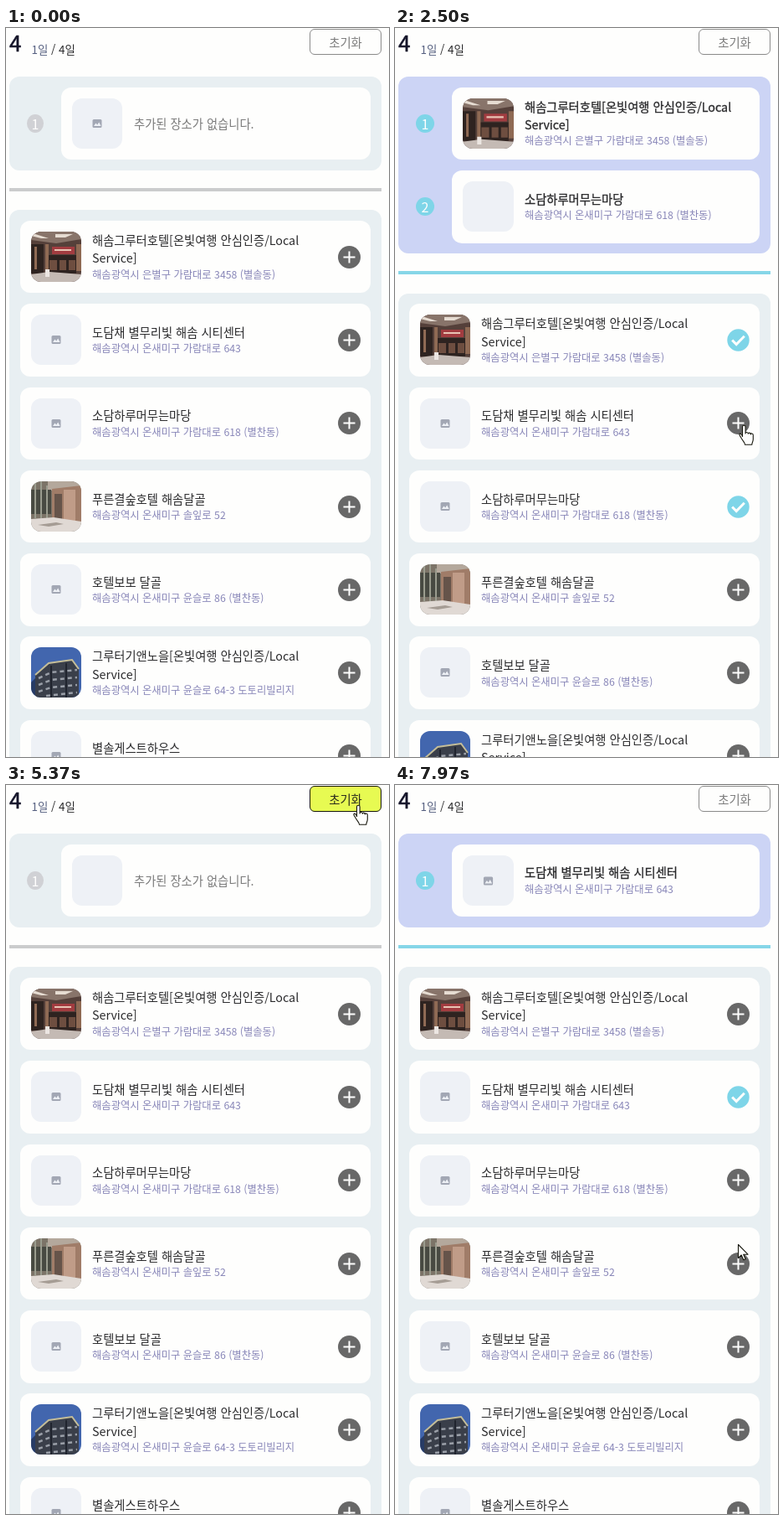
An HTML page for the animation above (8 s loop, 458 by 870 pixels).

```html
<!DOCTYPE html>
<html lang="ko">
<head>
<meta charset="utf-8">
<title>Trip planner</title>
<style>
html, body { margin: 0; width: 100%; height: 100%; overflow: hidden; background: #fefefd; }
body { font-family: 'Noto Sans CJK KR', 'Noto Sans CJK', 'Noto Sans', sans-serif; color: #2a2a2c; }
#stage { position: relative; width: 458px; height: 870px; overflow: hidden; }
#stage > *, .card, .badge, .thumb, .text, .mark { position: absolute; box-sizing: border-box; }
svg { display: block; }
.day { left: 4px; top: -1px; font: 500 26px/36px 'Noto Sans CJK KR', sans-serif; color: #15152a; -webkit-text-stroke: .5px; }
.span { left: 30.5px; top: 15px; font-size: 13.4px; line-height: 20px; white-space: nowrap; }
.span i { font-style: normal; color: #566080; }
#reset { left: 363px; top: 1px; width: 86px; height: 31px; border: 1px solid #8a8a8a; border-radius: 6px;
  font-size: 14.4px; line-height: 29px; text-align: center; color: #7c7c7c; }
#reset.hover { background: #e7fa52; border-color: #16160c; color: #2a2a1c; }
.panel { left: 4px; width: 445px; border-radius: 12px; background: #e8eff2; }
#plan { top: 58px; }
#plan.filled { background: #ccd4f5; }
#rule { left: 4px; width: 445px; height: 4px; background: #cbcccd; }
#rule.filled { background: #86d6e8; }
#list { height: 760px; }
.card { left: 13px; width: 419px; height: 86.5px; border-radius: 12px; background: #fefefd; }
.thumb { left: 13px; top: 13px; width: 60px; height: 60px; border-radius: 12px; overflow: hidden; background: #eef1f6; }
.text { left: 86px; top: -.7px; height: 100%; width: 275px; display: flex; flex-direction: column; justify-content: center; white-space: pre; }
.text b { font-weight: 400; font-size: 14.3px; line-height: 21.4px; }
.text small { font-size: 12.3px; line-height: 18.4px; color: #8886b8; }
.text .note { color: #7a7a7a; }
.mark { left: 380px; top: 29.7px; }
#plan .card { left: 62px; width: 370px; }
#plan.filled .card { left: 64px; width: 368px; }
#plan.filled .thumb { width: 61px; }
#plan.filled b { -webkit-text-stroke: .3px; }
#plan .text { left: 87px; }
.badge { left: 21px; width: 20px; height: 22px; border-radius: 50%; background: #d0d1d5; color: #fefefd;
  font-size: 16px; line-height: 22px; text-align: center; }
.filled .badge { width: 22px; background: #7ed5e8; }
#cursor { left: 0; top: 0; overflow: visible; }
</style>
</head>
<body>
<svg width="0" height="0" style="position:absolute">
  <symbol id="lobby" viewBox="0 0 60 60">
    <path fill="#55403a" d="M0 0h60v60H0z"/><path fill="#88746a" d="M0 0h60v9L30 14 0 10z"/>
    <path fill="#e6dcd2" d="M2 2l19 6h-9L0 5zM29 3h21l-9 4H29z"/>
    <path fill="#2e2320" d="M0 15h15v35H0zM20 28h34v22H20z"/>
    <path fill="#8f6a54" d="M4 18h3v27H4zM17 15h4v33h-4zM54 15h6v32h-6z"/>
    <path fill="#a23c40" d="M25 18h27v9H25z"/><path fill="#e8c4b4" d="M28 21h20v2H28z"/>
    <path fill="#6e4e40" d="M22 34h9v12h-9zM34 34h8v12h-8zM45 34h8v12h-8z"/>
    <path fill="#c4bab4" d="M0 51l22-3 38 3v9H0z"/><path fill="#ece6e2" d="M17 45h5v9h-5z"/>
  </symbol>
  <symbol id="garden" viewBox="0 0 60 60">
    <path fill="#7c7468" d="M0 0h60v60H0z"/><path fill="#b4a89c" d="M20 0h40v11H20z"/>
    <path fill="#484a42" d="M0 10h24v29H0z"/>
    <path stroke="#9a9c8e" stroke-width="2" d="M5 2v42M12 0v45M19 5v39"/>
    <path fill="#a07c68" d="M25 9l35-4v44H25z"/><path fill="#66544a" d="M28 15h9v31h-9z"/>
    <path fill="#c09c88" d="M39 10h14v39H39z"/>
    <path fill="#e0d9d4" d="M0 45l27-2 33 5v12H0z"/><path fill="#a59c94" d="M8 52l22-3 9 2-18 3z"/>
  </symbol>
  <symbol id="tower" viewBox="0 0 60 60">
    <path fill="#4266ae" d="M0 0h60v60H0z"/><path fill="#283c66" d="M0 42l8-8v26H0z"/>
    <path fill="#3a3f4a" d="M5 33l16-14 28-4 8 11v34H5z"/>
    <path fill="none" stroke="#c4bd98" stroke-width="2" d="M5 33l16-14 28-4 8 11"/>
    <path fill="none" stroke="#9a9fa8" stroke-width="2.5" stroke-dasharray="5 4" d="M9 37l15-7 31-3M9 45l15-6 31-3M9 53l15-5 31-3M18 58l37-4"/>
    <path stroke="#20242e" stroke-width="2" d="M24 22v38M42 19v41"/>
  </symbol>
  <symbol id="blank" viewBox="0 0 60 60">
    <rect x="24.5" y="25" width="11" height="10" rx="1.5" fill="#a2a7b4"/>
    <path fill="#eef1f6" d="M26 33l2.4-3.4 1.8 2 2-3 2.4 4.4z"/>
  </symbol>
  <symbol id="plus" viewBox="0 0 27 27">
    <circle cx="13.5" cy="13.5" r="13.5" fill="#686868"/>
    <path d="M13.5 6.5v14M6.5 13.5h14" stroke="#fefefd" stroke-width="2"/>
  </symbol>
  <symbol id="check" viewBox="0 0 27 27">
    <circle cx="13.5" cy="13.5" r="13.2" fill="#7ed5e8"/>
    <path d="M6.2 13.5l5 5 9.6-9.7" fill="none" stroke="#fefefd" stroke-width="3"/>
  </symbol>
</svg>
<div id="stage">
  <div class="day">4</div>
  <div class="span"><i>1일</i> / 4일</div>
  <div id="reset">초기화</div>
  <div id="plan" class="panel"></div>
  <div id="rule"></div>
  <div id="list" class="panel"></div>
  <svg id="cursor" width="1" height="1" fill="#fefefd" stroke="#16160c" stroke-width="1.1" stroke-linejoin="round">
    <path id="arrow" d="M.5.5V16.5L4.2 13 6.8 18.8 9.2 17.7 6.7 12.2H12z"/>
    <path id="hand" transform="translate(-6 -2)" d="M4.5 15V3a1.8 1.8 0 0 1 3.6 0v8c0-2.2 3.2-2 3.2.3 0-1.8 3-1.5 3 .6 0-1.6 3-1.2 3 .9v5c0 3-1.5 3.7-1.5 6.5H7.5c0-2.7-2.3-4-4.2-7.6C2 14 .2 13 .9 11.7c.9-1.4 2.7-.1 3.6 2.6"/>
  </svg>
</div>
<script>
const LOOP = 8000, PITCH = 99.3, LOAD = 350;
const city = '해솜광역시 ';
const places = [
  ['해솜그루터호텔[온빛여행 안심인증/Local\nService]', '은별구 가람대로 3458 (별솔동)', 'lobby'],
  ['도담채 별무리빛 해솜 시티센터', '온새미구 가람대로 643', 'blank'],
  ['소담하루머무는마당', '온새미구 가람대로 618 (별찬동)', 'blank'],
  ['푸른결숲호텔 해솜달골', '온새미구 솔잎로 52', 'garden'],
  ['호텔보보 달골', '온새미구 윤슬로 86 (별찬동)', 'blank'],
  ['그루터기앤노을[온빛여행 안심인증/Local\nService]', '온새미구 윤슬로 64-3 도토리빌리지', 'tower'],
  ['별솔게스트하우스', '달무구 솔미로 46 (별내동 푸른그린빌', 'blank']
];
// [time, chosen places]
const picks = [[0, []], [870, [0]], [2500, [0, 2]], [5150, []], [6780, [1]]];
// [time, x, y] of the pointer tip
const path = [
  [150, 460, 215], [550, 414, 272], [1400, 414, 272], [1630, 412, 436], [1780, 417, 475],
  [4220, 417, 475], [4470, 399, 259], [4750, 421, 25], [5550, 421, 25], [6000, 452, 180],
  [6500, 399, 372], [7600, 399, 372], [7900, 410, 548], [8000, 410, 548]
];

const $ = id => document.getElementById(id);
const use = (id, size) => `<svg width="${size}" height="${size}"><use href="#${id}"/></svg>`;
const thumb = (id, size) => `<div class="thumb">${id ? use(id, size) : ''}</div>`;
const label = ([name, street]) => `<div class="text"><b>${name}</b><small>${city}${street}</small></div>`;
const card = (row, html) => `<div class="card" style="top:${12.7 + row * PITCH}px">${html}</div>`;
const badge = row => `<div class="badge" style="top:${45 + row * PITCH}px">${row + 1}</div>`;

function planHtml(chosen, fresh) {
  if (!chosen.length) {
    return badge(0) + card(0, thumb(fresh ? '' : 'blank', 60) +
      '<div class="text"><b class="note">추가된 장소가 없습니다.</b></div>');
  }
  return chosen.map((id, row) => {
    const loading = fresh && row === chosen.length - 1;
    return badge(row) + card(row, thumb(loading ? '' : places[id][2], 61) + label(places[id]));
  }).join('');
}

function drawPanels(chosen, fresh) {
  const filled = chosen.length > 0, extra = Math.max(0, chosen.length - 1) * PITCH;
  $('plan').classList.toggle('filled', filled);
  $('rule').classList.toggle('filled', filled);
  $('plan').style.height = 111.5 + extra + 'px';
  $('rule').style.top = 191 + extra + 'px';
  $('list').style.top = 217.3 + extra + 'px';
  $('plan').innerHTML = planHtml(chosen, fresh);
  $('list').innerHTML = places.map((place, row) => card(row, thumb(place[2], 60) + label(place) +
    `<div class="mark">${use(chosen.includes(row) ? 'check' : 'plus', 27)}</div>`)).join('');
}

function pointerAt(t) {
  const next = path.findIndex(key => key[0] > t);
  if (next < 1) return null;
  const [t0, x0, y0] = path[next - 1], [t1, x1, y1] = path[next];
  const k = (t - t0) / (t1 - t0), ease = k * k * (3 - 2 * k);
  return [x0 + (x1 - x0) * ease, y0 + (y1 - y0) * ease];
}

function drawPointer(t, extra) {
  const tip = pointerAt(t);
  $('cursor').style.display = tip ? '' : 'none';
  if (!tip) return $('reset').classList.remove('hover');
  const [x, y] = tip;
  const overReset = x > 363 && x < 449 && y > 1 && y < 32;
  const overMark = places.some((_, row) => Math.hypot(x - 410.5, y - 273.5 - extra - row * PITCH) < 13.5);
  const hand = overReset || overMark;
  $('reset').classList.toggle('hover', overReset);
  $('hand').style.display = hand ? '' : 'none';
  $('arrow').style.display = hand ? 'none' : '';
  $('cursor').style.transform = `translate(${Math.round(x)}px, ${Math.round(y)}px)`;
}

const start = performance.now();
let shown = '';
function frame() {
  const t = (performance.now() - start) % LOOP;
  const [since, chosen] = picks.filter(pick => pick[0] <= t).pop();
  const fresh = since > 0 && t - since < LOAD;
  const key = since + '|' + fresh;
  if (key !== shown) drawPanels(chosen, fresh);
  shown = key;
  drawPointer(t, Math.max(0, chosen.length - 1) * PITCH);
  requestAnimationFrame(frame);
}
frame();
</script>
</body>
</html>
```
